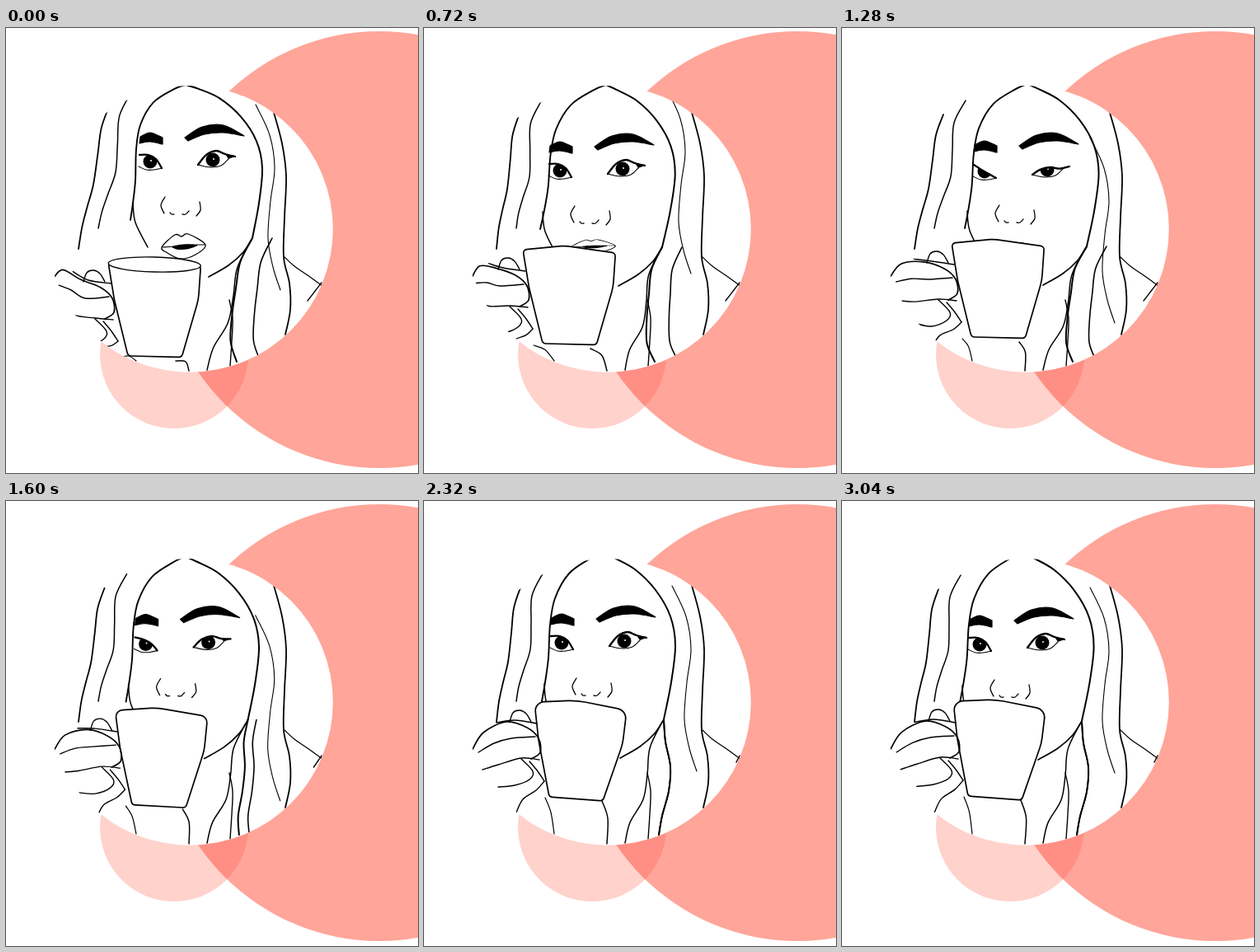
An HTML page with a canvas that plays this animation: 500 by 540 pixels, repeating every 3.12 s.

```html
<!DOCTYPE html>
<html lang="en">
<head>
<meta charset="utf-8">
<title>Coffee sip</title>
<style>
html, body { margin: 0; width: 100%; height: 100%; overflow: hidden; background: #fff; }
canvas { display: block; }
</style>
</head>
<body>
<canvas id="stage" width="500" height="540"></canvas>
<script>
const ctx = document.getElementById('stage').getContext('2d');
const STEP = 80, FRAMES = 39;
const STILL = [0, 0];
const WHITE = [223, 243.9, 173.8], CORAL = [453, 269, 265], PINK = [204, 396, 90];

const pairs = text => text.split(' ').map(p => p.split(',').map(Number));

// Movement of each group away from the resting drawing, at a few key frames.
const keyFrames = [0, 9, 16, 23, 29, 33, 38];
const keys = {
  crown: pairs('1,7 4,7 8,6 -5,5 0,0 7,1 2,0'),
  face: pairs('8,-10 -2,1 6,0 0,1 0,0 2,-1 0,2'),
  cup: pairs('-10,40 -14,25 -1,17 -2,5 0,0 2,-1 1,-1'),
  wisp: pairs('2,-10 -7,-30 0,30 3,40 0,0 1,-8 0,2'),
  lean: pairs('1 1 1 0 0 0 0'),
  open: pairs('1 0 0 0 0 0 0'),
  squint: pairs('0 0 1 0 0 0 0')
};

const art = {
  hairL: '217,62 203,69 176,88 159,118 153,150 151,190 147,220 143,243',
  hairR: '217,62 231,69 256,83 281,108 299,140 305,175 300,220 291,265',
  jawL: '146,222 149,246 164,276',
  jawR: '291,265 280,282 262,298 238,312',
  sideA: '117,105 109,130 106,160 102,195 96,220 91,243 88,268',
  sideB: '144,88 131,115 130,148 129,180 121,205 115,225 112,243',
  outer: '324,99 335,140 340,180 338,230 337,278 344,310 345,342 339,372',
  wisp: '301,103 318,140 324,180 319,220 316,265 322,300 331,328',
  lockA: '291,265 293,292 299,322 297,352 289,382 285,405',
  lockB: '288,270 274,300 271,332 266,362 250,390 244,415',
  lockC: '271,330 275,352 274,380 272,410',
  shoulder: '338,278 350,289 366,300 384,313',
  collar: '379,317 381,313 383,309',
  sleeveR: '216,364 223,385 222,416',
  sleeveL: '147,360 154,378 158,404',
  browTopR: '209,143 230,130 256,128 281,141',
  browLowR: '213,147 233,139 256,137 281,141',
  browTopL: '155,142 167,137 182,143',
  browLowL: '154,150 167,148 182,151',
  lidR: '225,176 235,164 247,159 258,163 270,166',
  underR: '225,176 240,179 253,177 262,169',
  lidL: '154,164 165,164 174,169 181,180',
  underL: '153,178 162,182 172,182 181,180',
  irises: '243,170 167,172',
  nostrilL: '185,215 180,225 184,235',
  tipL: '191,234 193,236 196,236',
  tipR: '206,236 210,236 214,232',
  nostrilR: '227,221 228,231 223,238',
  bump: '104,268 108,257 116,254 124,258 130,268',
  bar: '88,269 110,266 137,270',
  knuckle: '58,303 72,281 100,268 125,275 139,288 141,305 130,313',
  fingerA: '66,305 85,294 106,288 135,286',
  fingerB: '71,326 90,320 118,312 140,314',
  fingerC: '90,347 110,345 128,338 132,328 118,313',
  thumb: '128,316 138,328 146,340',
  palm: '146,340 136,351 120,362 112,378'
};
for (const name in art) art[name] = pairs(art[name]);

// Lips are drawn around the dip of the upper lip.
const LIP_DIP = [205, 262];
const lips = pairs('-24,14 -8,-1 0,1 8,-2 29,11 17,23 -1,28 -17,21');
const mouthTop = pairs('-23,14 -10,13 2,11 18,11 28,11');
const mouthLow = pairs('-12,14 -4,17 9,16 20,12');

// Corner points of the cup with a rounding radius each.
const CUP_PIVOT = [134, 244];
const cupCorners = pairs('134,244,11 185,242,90 246,254,12 241,295,60 217,364,5 152,359,5 139,290,80');

const mix = (a, b, u) => a.map((v, i) => v + (b[i] - v) * u);

function poseAt(frame) {
  let k = keyFrames.length - 2;
  while (keyFrames[k] > frame) k--;
  const u = (frame - keyFrames[k]) / (keyFrames[k + 1] - keyFrames[k]);
  const pose = {};
  for (const name in keys) pose[name] = mix(keys[name][k], keys[name][k + 1], u);
  return pose;
}

// Shifts the first point by `from`, the last by `to`, the rest in between.
function move(p, from, to = from) {
  return p.map(([x, y], i) => {
    const [dx, dy] = mix(from, to, i / (p.length - 1));
    return [x + dx, y + dy];
  });
}
const bend = (p, rule) => p.map(([x, y], i) => [x + rule(i / (p.length - 1)), y]);

// Fingertips stay put at the left while the knuckles follow the cup.
function grip(p, [dx, dy]) {
  const clamp = v => Math.max(0, Math.min(1, v));
  return p.map(([x, y]) => {
    const w = clamp((x - 58) / 45) * clamp((390 - y) / 45);
    return [x + dx * w, y + dy * w];
  });
}

// Smooth curve through all the points.
function curve(p, closed) {
  const n = p.length;
  const at = i => closed ? p[(i + n) % n] : p[Math.max(0, Math.min(n - 1, i))];
  ctx.lineTo(...p[0]);
  for (let i = 0; i < (closed ? n : n - 1); i++) {
    const [a, b, c, d] = [at(i - 1), at(i), at(i + 1), at(i + 2)];
    ctx.bezierCurveTo(
      b[0] + (c[0] - a[0]) / 6, b[1] + (c[1] - a[1]) / 6,
      c[0] - (d[0] - b[0]) / 6, c[1] - (d[1] - b[1]) / 6, c[0], c[1]);
  }
}
function stroke(width) {
  ctx.lineWidth = width;
  ctx.stroke();
}
function line(p, width, closed) {
  ctx.beginPath();
  curve(p, closed);
  stroke(width);
}
function between(top, low) {
  ctx.beginPath();
  curve(top);
  curve(low.slice().reverse());
  ctx.closePath();
}
function disc([x, y, r], color) {
  ctx.beginPath();
  ctx.arc(x, y, r, 0, Math.PI * 2);
  ctx.fillStyle = color;
  ctx.fill();
}
function scoped(action) {
  ctx.save();
  action();
  ctx.restore();
}

function backdrop() {
  ctx.fillStyle = '#fff';
  ctx.fillRect(0, 0, 500, 540);
  disc(PINK, '#ffd2cc');
  disc(CORAL, '#ffa599');
  scoped(() => {
    ctx.clip();
    disc(PINK, '#ff8f84');
  });
  disc(WHITE, '#fff');
}

function hair({ crown, face, wisp, lean: [lean] }) {
  line(move(art.hairL, crown, face), 1.9);
  line(move(art.hairR, crown, face), 2);
  line(move(art.jawL, face), 1.5);
  line(move(art.jawR, face), 1.7);
  line(move(art.sideA, face, STILL), 1.8);
  line(move(art.sideB, face, STILL), 1.5);
  line(art.outer, 1.8);
  line(move(art.wisp, wisp), 1.1);

  // The front lock splits in two while she leans back.
  const lock = move(art.lockA, face, STILL);
  const bow = t => Math.sin(Math.PI * t);
  line(bend(lock, t => -24 * lean * bow(t) - 5 * lean * t), 2);
  line(bend(lock, t => 24 * lean * (1 - bow(t))), 1.6);
  line(move(art.lockB, face, STILL), 1.5);
  line(art.lockC, 1.4);
}

function clothes({ cup, lean: [lean] }) {
  line(art.shoulder, 1.3);
  line(move(art.collar, [-13 * lean, 14 * lean], STILL), 1.4);
  line(move(art.sleeveR, cup, STILL), 1.5);
  line(move(art.sleeveL, cup, STILL), 1.2);
}

function eye(lid, under, iris, squint) {
  const upper = lid.map(([x, y], i) =>
    [x, y + 8 * squint * Math.sin(Math.PI * i / (lid.length - 1))]);
  scoped(() => {
    between(upper, under);
    ctx.clip();
    disc([...iris, 8.5], '#000');
    disc([iris[0] + 1, iris[1] - 1, 1], '#fff');
  });
  // Eyeliner fills the outer corner.
  between(upper.slice(-2), [under[under.length - 1]]);
  ctx.fill();
  line(upper, 2.3);
  line(under, 1.1);
}

function features({ face, squint: [squint], open: [open] }) {
  scoped(() => {
    ctx.translate(...face);
    ctx.fillStyle = '#000';
    for (const side of ['R', 'L']) {
      between(art['browTop' + side], art['browLow' + side]);
      ctx.fill();
      stroke(1.2);
    }
    for (const name of ['nostrilL', 'tipL', 'tipR', 'nostrilR']) line(art[name], 1.3);
    ctx.translate(0, 2 * squint);
    ['R', 'L'].forEach((side, i) => {
      ctx.fillStyle = '#000';
      eye(art['lid' + side], art['under' + side], art.irises[i], squint);
    });
  });
  scoped(() => {
    ctx.translate(LIP_DIP[0] + face[0], LIP_DIP[1] + face[1] - 5 * (1 - open) * (1 - squint));
    ctx.scale(1, 0.55 + 0.45 * open);
    line(lips, 1.3, true);
    line(mouthTop, 1.1);
    between(mouthTop.slice(1, -1), mouthLow);
    ctx.fillStyle = '#000';
    ctx.fill();
  });
}

function mug({ cup, lean: [lean], open: [open] }) {
  const [px, py] = CUP_PIVOT;
  scoped(() => {
    ctx.translate(px + cup[0], py + cup[1]);
    ctx.rotate(-0.053 * lean);
    ctx.translate(-px, -py);
    const n = cupCorners.length;
    const [ax, ay] = mix(cupCorners[n - 1], cupCorners[0], 0.5);
    ctx.beginPath();
    ctx.moveTo(ax, ay);
    cupCorners.forEach(([x, y, r], i) => {
      const [nx, ny] = cupCorners[(i + 1) % n];
      ctx.arcTo(x, y, nx, ny, r * (i < 3 ? 1 - 0.6 * lean : 1));
    });
    ctx.closePath();
    ctx.fillStyle = '#fff';
    ctx.fill();
    stroke(1.7);
    if (open > 0.05) {
      ctx.beginPath();
      ctx.ellipse(190, 250, 56, 9 * open, 0.08, 0, Math.PI * 2);
      ctx.fill();
      stroke(1.4);
    }
  });
}

function hand({ cup }) {
  for (const name of ['bump', 'bar', 'knuckle', 'fingerA', 'fingerB', 'fingerC', 'thumb', 'palm'])
    line(grip(art[name], cup), name === 'knuckle' ? 1.7 : 1.4);
}

function draw(frame) {
  const pose = poseAt(frame);
  backdrop();
  scoped(() => {
    ctx.clip();
    ctx.strokeStyle = '#000';
    ctx.lineCap = ctx.lineJoin = 'round';
    for (const part of [hair, clothes, features, mug, hand]) part(pose);
  });
}

const start = performance.now();
let shown = -1;
function tick() {
  const frame = Math.floor((performance.now() - start) / STEP) % FRAMES;
  if (frame !== shown) draw(shown = frame);
  requestAnimationFrame(tick);
}
tick();
</script>
</body>
</html>
```
